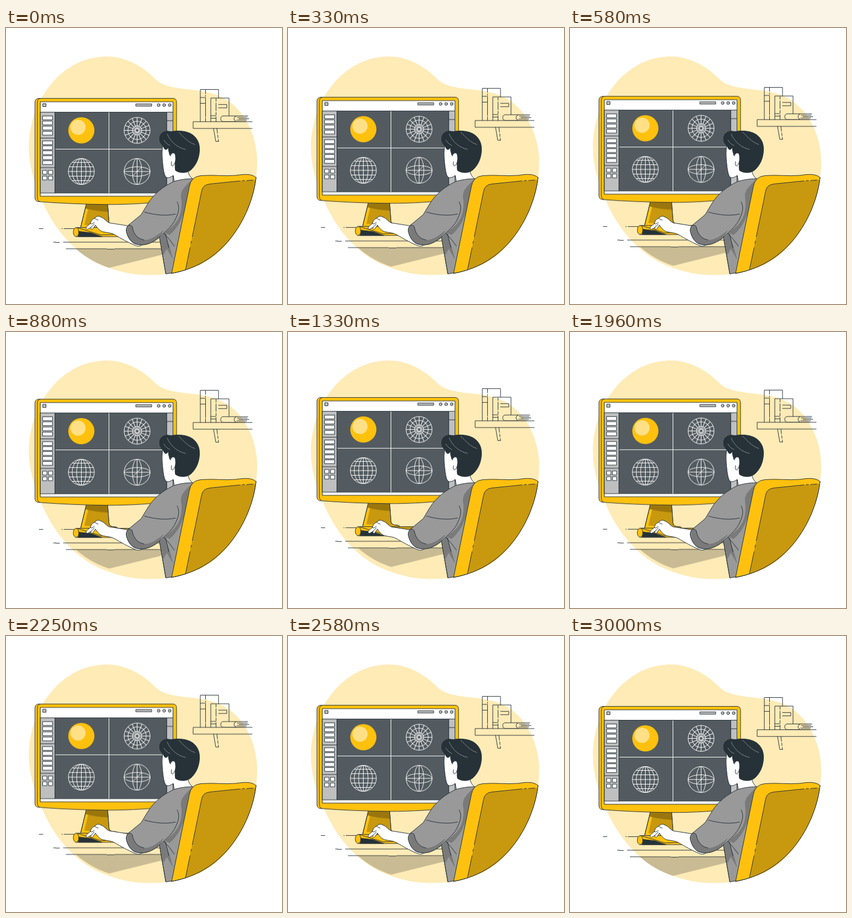
Recreate the animation shown at these times as an HTML page without scripts. Size 500 px wide and 500 px high, loop 3.04 s.

```html
<!DOCTYPE html>
<html lang="en">
<head>
<meta charset="utf-8">
<title>Designer at a desk</title>
<style>
html, body { margin: 0; width: 100%; height: 100%; overflow: hidden; background: #fff; }
svg { display: block; width: 100%; height: 100%; }
.ink { stroke: #263238; stroke-width: 1; stroke-linecap: round; stroke-linejoin: round; }
.line { fill: none; }
.gold { fill: #ffc10e; }
.deep { fill: #c8980f; }
.grey { fill: #bfbfbf; }
.fold { fill: #7a7a7a; }
.white { fill: #fff; }
.dark { fill: #263238; }
.wire { fill: none; stroke: #fff; stroke-width: 1; }
.float { animation: float 3040ms linear infinite; }
@keyframes float {
  0% { transform: translateY(0); }
  47.7% { transform: translateY(-9.67px); }
  97.04% { transform: translateY(.33px); }
  100% { transform: translateY(-.27px); }
}
</style>
</head>
<body>
<svg viewBox="0 0 500 500">
<defs>
  <rect id="key" x="66.5" width="18" height="6.8"/>
  <rect id="cell" width="7.4" height="7"/>
  <path id="spokes" d="M-23.5 0H-3M3 0H23.5M0-23.5V-3M0 3V23.5"/>
</defs>

<path fill="#ffebb6" d="M183 51.5C218 51.5 249 71 270 92C292 116 346 106 386 123C431 142 455 194 455 243Q455 257 453 271C446 332 402 427 300 444.500Q281 447.500 260 447.500C234 447.500 208 443 187 434.500C164 427 144 415 127 400C96 373 77 341 63 308C50 277 41.500 247 41.500 217C41.500 128 103 51.500 183 51.500Z"/>

<g class="float">
  <!-- shelf -->
  <g class="ink line">
    <path d="M446 169.800H339V182H446M376 182L380 205.500H385"/>
    <path d="M382 182L385 205.500" stroke-dasharray="9 3 5 3"/>
    <path d="M352 169.800V111.500H385V127M352 126H361.500M352 136.500H361.500"/>
    <path d="M361.500 112V169.800" stroke-dasharray="7 3 2 3 34 2"/>
    <path d="M371 169.800V127H404V159M371 159H380M371 163.500H380M385 138.700H400V144.700H385"/>
    <path d="M380.500 128V169.800" stroke-dasharray="5 3 14 3"/>
    <path d="M438 159.300H394Q389 159.300 389 164.500Q389 169.500 394 169.500H434M417 159.500Q413 161 413 164.500Q413 168 417 169.500M419 162H437M422 164.500H440M418 167H436"/>
  </g>

  <!-- desk -->
  <path fill="#c9bb93" d="M127 400.500H290V409L187 434.500Q154 424 127 400.500Z"/>
  <path class="ink line" d="M60 363.500H67M101 363.500H102M105 363.500H152M86 388H90M90 388.500H97M104 388H280M109 400H182M183 400.700H196M197 400H287"/>

  <!-- stand and keyboard -->
  <path class="ink gold" d="M146 317L134.500 364H203Q203 359 197 359Q187 359 186.500 352L184 317Z"/>
  <path class="deep" d="M151 318H184L186.500 352Q187 358 191 360L142 357Z"/>
  <path fill="#9a760c" d="M147 318H184.500L185 333Q162 332 144 327Z"/>
  <path class="ink line" d="M146 317L134.500 364M184 317L186.500 352Q187 359 197 359Q203 359 203 363"/>
  <path class="ink gold" d="M127 361.500H240L225 378H127Z"/>
  <path class="deep" d="M186 362H238L225 373H190Z"/>
  <path class="ink dark" d="M132 368.500L154 371L174 378H131Z"/>
  <path class="ink line" d="M130 362L172 375L196 374"/>
  <ellipse class="ink gold" cx="127" cy="369.800" rx="5" ry="8.200"/>

  <!-- monitor -->
  <path class="ink gold" d="M60 127.500H302Q309 127.500 309 134.500V305Q309 311 303 312C270 317 225 320 181 319.800Q115 319 58 314.500Q52.400 313.500 52.400 307V135Q52.400 127.500 60 127.500Z"/>
  <path class="ink line" d="M63 127.500Q56.700 128 56.700 135V307Q56.700 313 61.500 314.700"/>
  <rect class="ink white" x="62.500" y="133.800" width="240" height="171"/>
  <rect class="ink grey" x="62.500" y="152.500" width="26.500" height="146.500"/>
  <rect class="ink" fill="#535b60" x="89" y="152.500" width="203" height="146.500"/>
  <rect class="ink grey" x="291.500" y="152.500" width="11" height="146.500"/>
  <path class="ink line" d="M62.500 199.500H89M62.500 253H89M291.500 168H302.500"/>
  <path class="wire" d="M186.500 153V299M89.500 219.500H291"/>
  <g class="ink grey">
    <rect x="67" y="137" width="5.500" height="5.500"/>
    <rect x="235.500" y="137.600" width="28.500" height="4"/>
    <circle cx="276.500" cy="139.700" r="2.600"/>
    <circle cx="286.500" cy="139.700" r="2.600"/>
    <circle cx="296.500" cy="139.700" r="2.600"/>
  </g>
  <g class="ink white">
    <use href="#key" y="159.500"/><use href="#key" y="168.700"/><use href="#key" y="178"/><use href="#key" y="187.300"/>
    <use href="#key" y="204.700"/><use href="#key" y="213.600"/><use href="#key" y="222.500"/><use href="#key" y="231.500"/><use href="#key" y="240.500"/>
    <use href="#cell" x="66.700" y="258"/><use href="#cell" x="77.300" y="258"/>
    <use href="#cell" x="66.700" y="268.300"/><use href="#cell" x="77.300" y="268.300"/>
  </g>

  <!-- four views -->
  <circle class="gold" cx="136.500" cy="185.500" r="23.700"/>
  <circle cx="130.500" cy="180" r="13.700" fill="#ffe086"/>
  <g class="wire" transform="translate(237.500 185.500)">
    <circle r="23.500"/><circle r="16.500"/><circle r="8.500"/><circle r="3"/>
    <use href="#spokes"/>
    <use href="#spokes" transform="rotate(22.500)"/>
    <use href="#spokes" transform="rotate(45)"/>
    <use href="#spokes" transform="rotate(67.500)"/>
  </g>
  <g class="wire" transform="translate(136.500 260)">
    <circle r="23.500"/><ellipse rx="16.500" ry="23.500"/><ellipse rx="8.500" ry="23.500"/>
    <path d="M0-23.500V23.500M-23.500 0H23.500M-22-8.500H22M-22 8.500H22M-16.700-16.500H16.700M-16.700 16.500H16.700"/>
  </g>
  <g class="wire" transform="translate(237.500 260)">
    <circle r="23.500"/><ellipse rx="8.500" ry="23.500"/><ellipse rx="23.500" ry="8.500"/>
    <path d="M-23.500 0H23.500M0-23.500V23.500M-7 7L8-8"/>
  </g>
</g>

<!-- forearm and hand -->
<path class="ink white" d="M222 358.500L187 353C182 351 178 344 171 342C167 340 164 341 161 344.500C156 346 154 350 153 354C150 357 146 359 145 362C145 365 148 365 150 363.500L154 361C153 365 156 366 158 363L162 357C166 363 170 368 177 369.500C185 371 190 371 196 374C208 381 222 389 232 393C238 396 243 396 246 393L238 360Z"/>
<path class="ink line" d="M153 354Q155 357 160 352M154 361L160 355M161 344.500Q164 348 167 348"/>

<!-- neck and face -->
<path class="ink white" d="M284 212C282 225 283 236 284 246C285 255 286 264 289 269C292 273 298 271 303 267L305 278L338 273Q331 269 329 256L310 200Z"/>

<!-- shirt -->
<path class="ink" fill="#999" d="M338 273C325 273 314 275 304 278C285 287 268 300 257 318L245 338L222 357C218 361 217 366 219 372C222 382 228 389 234 391C248 396 264 391 278 379L289.500 445.500L304 443L342 275Z"/>
<path class="fold" d="M336 275C327 285 316 293 317 306C320 325 317 342 305 356C300 361 293 366 288 371L296 375C308 366 319 348 323 330L338 276Z"/>
<path class="fold" d="M279 380L288 371Q291 385 296 395L303 420L291 400L285 412Z"/>
<path class="fold" d="M222 357Q228 357 229 361C231 373 238 382 250 384C263 384 272 377 286 366L278 379C264 391 248 396 234 391C226 388 215 370 222 357Z"/>
<path class="ink line" d="M251 333.500C270 339 290 341 307 337M310 315C315 324 313 333 308 344C303 357 290 368 278 379M222 357Q228 357 229 361C231 373 238 382 250 384M286 372Q296 382 305 395M289 373L295 398"/>
<path class="ink line" d="M222 357C218 361 217 366 219 372C222 382 228 389 234 391C248 396 264 391 278 379L289.500 445.500"/>

<!-- hair -->
<path class="ink dark" d="M278.500 204C277 197 280 190 287 188C292 185 298 189 303 187C318 185 335 188 343 198C349 205 351 213 350.500 222C350 235 345 248 335 257C327 264 314 263 307 258C305 250 308 240 306 233C304 226 299 226 297 231C295 225 294 220 294 216C291 222 288 221 286 217C284 212 280 211 278.500 204Z"/>
<path class="ink white" d="M298 232C300 224 307 225 307 232C308 240 306 249 301 250C299 249 299 245 300 242"/>
<path fill="none" stroke="#a9b0b3" stroke-width=".7" stroke-linecap="round" d="M292 192C298 206 309 216 325 220M313 189C322 197 329 207 342 211M286 203Q290 210 297 213"/>

<!-- chair -->
<path class="ink gold" d="M300 444.500L332 288Q335 269 353 267.500C376 265.500 395 269 417 267C432 264.500 446 264 453 271C446 332 402 427 300 444.500Z"/>
<path class="deep" d="M325 438.500L354.500 295Q357 283.500 370 282.500L424 277Q440 276.500 452.300 274.500C445 332 405 417 325 438.500Z"/>
<path class="ink line" d="M325 438.500L333.500 398M335 390L336 386M337.500 378L354.500 295Q357 283.500 370 282.500L424 277M428 276.700L432 276.500M436 276.300L447 275.500"/>
<path class="ink line" d="M453 271C446 332 402 427 300 444.500"/>
</svg>
</body>
</html>
```
